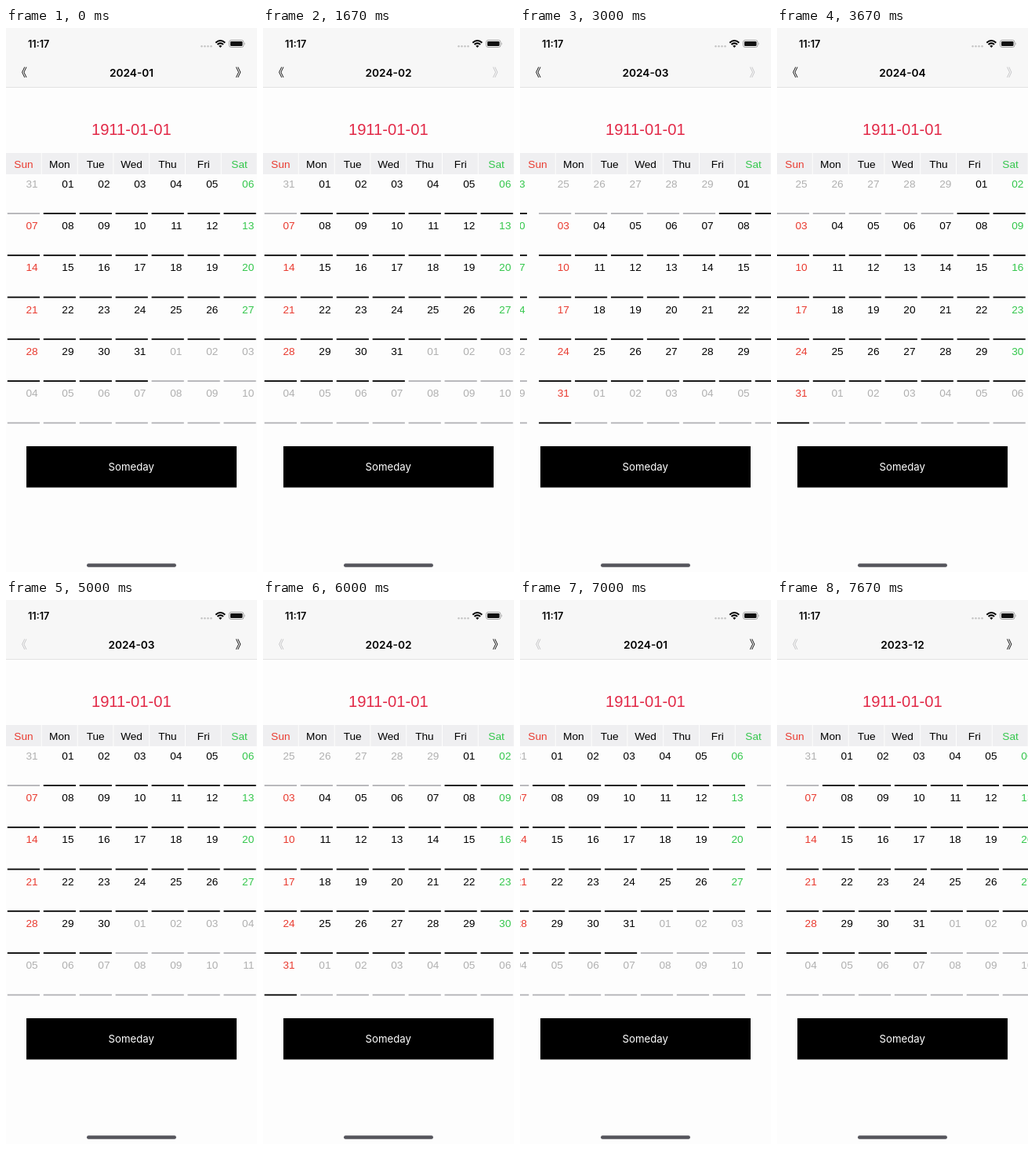
Recreate the animation shown at these times as an HTML page. Size 320 by 692 pixels, loop 8 s.

```html
<!DOCTYPE html>
<html lang="en">
<head>
<meta charset="utf-8">
<title>Calendar</title>
<style>
  html, body { margin: 0; width: 100%; height: 100%; overflow: hidden; background: #fdfdfd; }
  svg { display: block; width: 320px; height: 692px; }
  text { font-family: "Liberation Sans", Arial, sans-serif; font-size: 13.65px; fill: #000; }
  .mid { text-anchor: middle; }
  .end { text-anchor: end; }
  .ui { font-family: Inter, Roboto, sans-serif; font-size: 13.2px; }
  .bold { font-family: Inter, Roboto, sans-serif; font-weight: 600; }
  .arrow { font-family: "Noto Sans CJK SC", "Noto Sans CJK JP", "Noto Sans CJK", sans-serif; font-size: 14.5px; }
  .arrow.dim { fill: #c2c2c4; }
  text.sun { fill: #e93b30; }
  text.sat { fill: #34c74c; }
  text.out { fill: #b0b0b0; }
  rect.out { fill: #b2b2b6; }
</style>
</head>
<body>
<svg viewBox="0 0 320 692">
  <rect width="320" height="692" fill="#fdfdfd"/>
  <rect width="320" height="75.5" fill="#f7f7f7"/>
  <rect y="75" width="320" height="1" fill="#e2e2e2"/>

  <text class="bold" x="28" y="24.5" style="font-size:12.6px">11:17</text>
  <g fill="#c4c4c4">
    <circle cx="249.5" cy="23.3" r="1.2"/><circle cx="253.5" cy="23.3" r="1.2"/>
    <circle cx="257.5" cy="23.3" r="1.2"/><circle cx="261.5" cy="23.3" r="1.2"/>
  </g>
  <g fill="none" stroke="#000" stroke-width="2">
    <path d="M267.3 18.7Q273.3 13.2 279.3 18.7M269.5 21.1Q273.3 17.6 277.1 21.1"/>
  </g>
  <path d="M271.2 22.8Q273.3 21 275.4 22.8L273.3 25Z"/>
  <rect x="284.5" y="15.5" width="18.5" height="9" rx="2.6" fill="none" stroke="#a4a4a4"/>
  <rect x="286" y="17" width="15.5" height="6" rx="1.3" fill="#111"/>
  <path d="M304 18.3Q305.7 20 304 21.7Z" fill="#a4a4a4"/>

  <text class="arrow" id="prev" x="12.4" y="62.4">《</text>
  <text class="arrow" id="next" x="292.5" y="62.4">》</text>
  <text class="bold mid" id="title" x="160" y="61.7" style="font-size:13.7px">2024-01</text>

  <text class="mid" x="159.8" y="136" style="font-size:20.2px;fill:#e22a48">1911-01-01</text>
  <g id="week"></g>
  <g id="pages"></g>

  <rect x="26" y="532" width="268" height="52.5"/>
  <text class="ui mid" x="159.7" y="563.2" style="fill:#fff">Someday</text>
  <rect x="103" y="681.3" width="114" height="4.4" rx="2.2" fill="#55555c"/>
</svg>
<script>
const $ = id => document.getElementById(id);
const pad = n => String(n).padStart(2, "0");
const LOOP = 8000, STEP = 1000 / 3, COL = 45.95, ROW = 53.3, PAGE = 332;
const SLIDE = 300, LEAD = 90;

// Slide starts; months count from January 2024.
const slides = [[1740, 1], [2750, 2], [3652, 3], [5080, 2], [6060, 1], [6760, 0], [7633, -1]];

function add(parent, tag, attrs, text) {
  const el = document.createElementNS("http://www.w3.org/2000/svg", tag);
  for (const key in attrs) el.setAttribute(key, attrs[key]);
  if (text) el.textContent = text;
  parent.appendChild(el);
  return el;
}

const dayClass = col => col === 0 ? "sun" : col === 6 ? "sat" : "";

["Sun", "Mon", "Tue", "Wed", "Thu", "Fri", "Sat"].forEach((name, i) => {
  add($("week"), "rect", { x: i * 45.8, y: 159, width: 44.8, height: 27, fill: "#efeff1" });
  add($("week"), "text", { x: 22.5 + i * 45.85, y: 177.7, class: "mid " + dayClass(i) }, name);
});

function addMonth(month) {
  const page = add($("pages"), "g", { transform: `translate(${month * PAGE})` });
  const first = new Date(2024, month, 1);
  for (let i = 0; i < 42; i++) {
    const date = new Date(2024, month, 1 - first.getDay() + i);
    const col = i % 7, row = Math.floor(i / 7);
    const out = date.getMonth() !== first.getMonth();
    add(page, "text", {
      x: 40.6 + col * COL, y: 202.7 + row * ROW, class: "end " + (out ? "out" : dayClass(col))
    }, pad(date.getDate()));
    add(page, "rect", {
      x: 1.8 + col * COL, y: 235 + row * ROW, width: 41.2, height: 1.8, class: out ? "out" : ""
    });
  }
}
for (let m = -1; m <= 3; m++) addMonth(m);

// The screen refreshes three times a second after an initial pause.
const sample = t => t < 1000 ? 0 : 1000 + Math.floor((t - 996) / STEP) * STEP;

function draw(now) {
  const t = sample(now % LOOP);
  let pos = 0, month = 0;
  for (const [start, to] of slides) {
    const p = Math.min(1, Math.max(0, (t - start) / SLIDE));
    pos += (to - pos) * (1 - Math.cos(Math.PI * p)) / 2;
    if (t >= start - LEAD) month = to;
  }
  const date = new Date(2024, month, 1);
  $("title").textContent = date.getFullYear() + "-" + pad(date.getMonth() + 1);
  $("pages").setAttribute("transform", `translate(${-pos * PAGE})`);
  $("next").classList.toggle("dim", t > 1300 && t < 4300);
  $("prev").classList.toggle("dim", t > 4300);
}

const begin = performance.now();
function tick() {
  draw(performance.now() - begin);
  requestAnimationFrame(tick);
}
tick();
</script>
</body>
</html>
```
